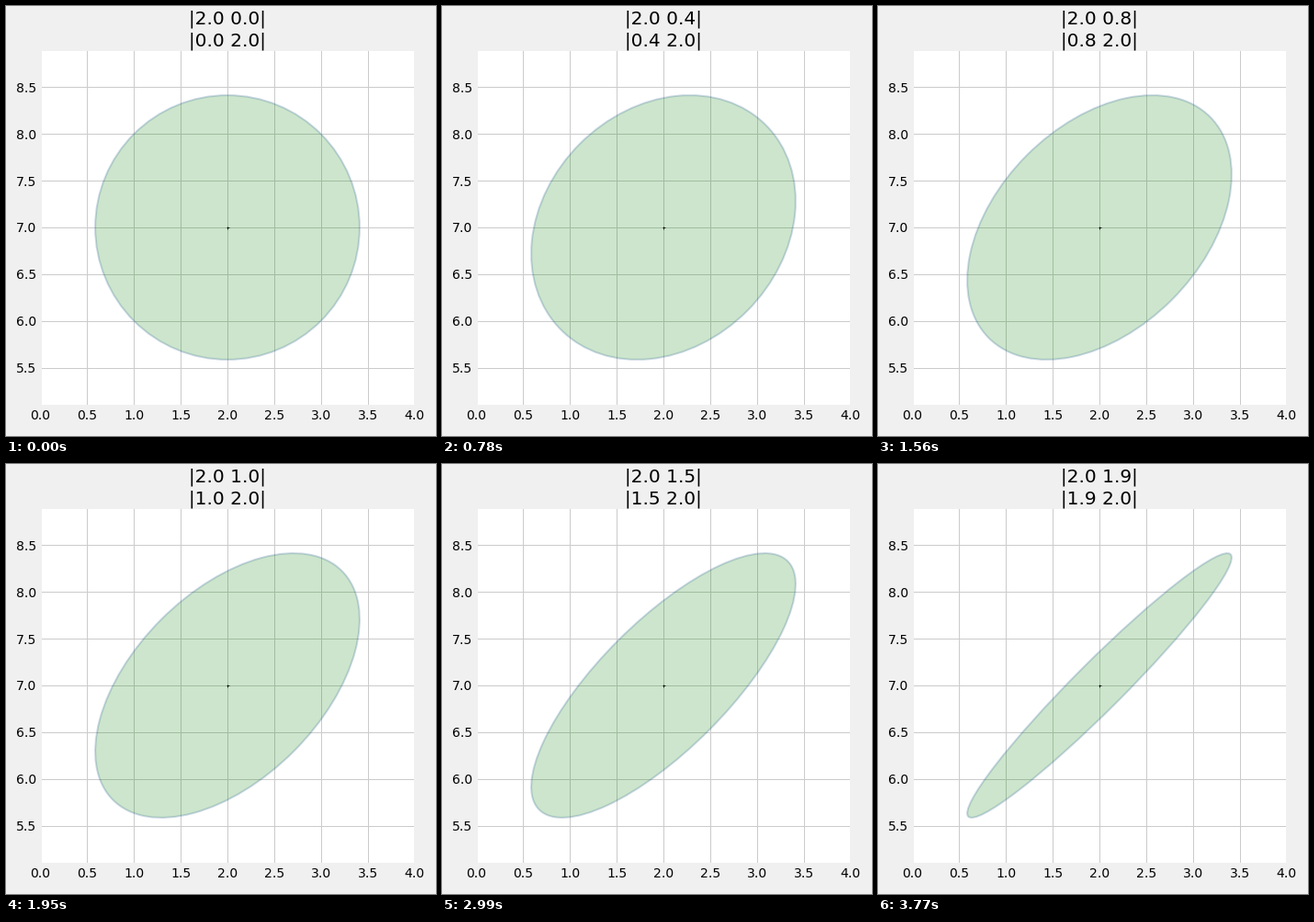
A matplotlib script that plays this animation: 468 by 468 pixels, repeating every 3900 ms.

```python
import numpy as np
import matplotlib.pyplot as plt
from matplotlib.animation import FuncAnimation
from matplotlib.patches import Ellipse

SIZE, DPI = 468, 72
FRAMES, INTERVAL = 30, 130
VAR = 2.0
MEAN = (2.0, 7.0)
CENTER, UNIT = 241.0, 101.75      # pixel of the mean, pixels per data unit
TOP, BOTTOM = 48.0, 435.0         # axes edges in pixels from the top
BACK, GRID = "#f0f0f0", "#cbcbcb"

plt.rcParams["font.family"] = "DejaVu Sans"

fig = plt.figure(figsize=(SIZE / DPI, SIZE / DPI), dpi=DPI, facecolor=BACK)
left, width = CENTER - 2 * UNIT, 4 * UNIT
ax = fig.add_axes([left / SIZE, 1 - BOTTOM / SIZE,
                   width / SIZE, (BOTTOM - TOP) / SIZE], facecolor="white")
ax.set_xlim(0, 4)
ax.set_ylim(MEAN[1] - (BOTTOM - CENTER) / UNIT,
            MEAN[1] + (CENTER - TOP) / UNIT)
ax.set_xticks(np.arange(0, 4.1, 0.5))
ax.set_yticks(np.arange(5.5, 8.6, 0.5))
ax.xaxis.set_major_formatter("{x:.1f}")
ax.yaxis.set_major_formatter("{x:.1f}")
ax.tick_params(length=0, pad=4, labelsize=14)
ax.set_axisbelow(True)
ax.grid(color=GRID, linewidth=1, linestyle="-")
for spine in ax.spines.values():
    spine.set(color=BACK, linewidth=2)

ellipse = ax.add_patch(Ellipse(MEAN, 1, 1, angle=45, facecolor="g",
                               edgecolor="#004080", alpha=0.2, linewidth=2))
ax.plot(*MEAN, "+", color="black", markersize=3, markeredgewidth=0.8)


def title_row(baseline):
    return fig.text(CENTER / SIZE, 1 - baseline / SIZE, "", fontsize=20.16,
                    ha="center", va="baseline", color="black")


rows = title_row(20), title_row(43)


def update(i):
    cov = VAR * i / FRAMES
    ellipse.width = 2 * np.sqrt(VAR + cov)
    ellipse.height = 2 * np.sqrt(VAR - cov)
    rows[0].set_text(f"|{VAR:.1f} {cov:.1f}|")
    rows[1].set_text(f"|{cov:.1f} {VAR:.1f}|")
    return (ellipse, *rows)


anim = FuncAnimation(fig, update, frames=FRAMES, interval=INTERVAL,
                     repeat=True, repeat_delay=0, blit=False)
plt.show()
```
